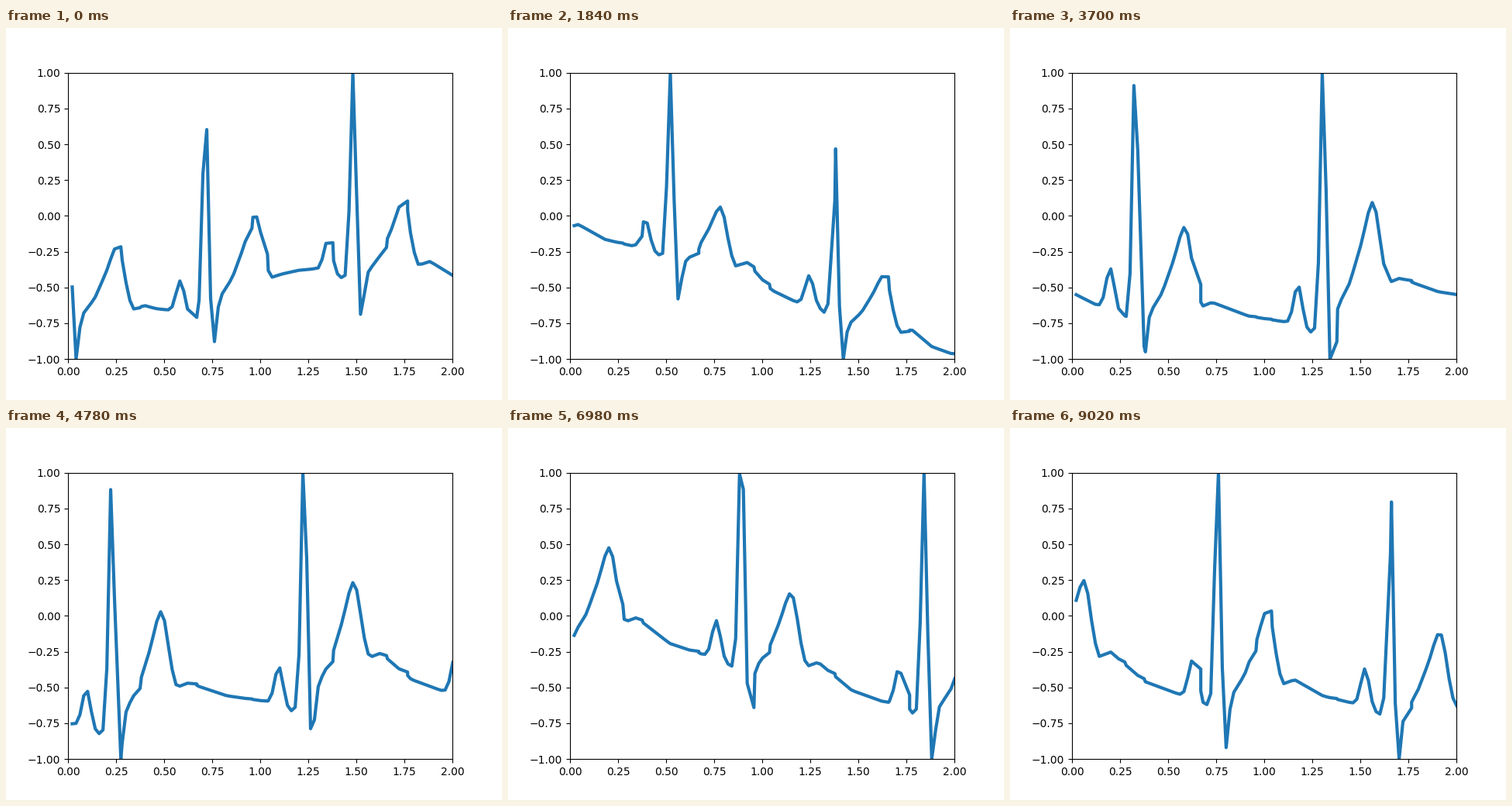
Write a matplotlib script that moves like this. It is 640 by 480 pixels and loops after 9.04 s.

```python
import numpy as np
import matplotlib.pyplot as plt
from matplotlib.animation import FuncAnimation

FRAMES, WINDOW, STEP = 452, 100, .02

# Time of each R peak in samples, resting level before and after the beat
BEATS = [(-.2, -.64, -.635), (35.64, -.64, -.42), (74.08, -.36, -.335),
         (118, -.47, -.62), (160.7, -.89, -1.12), (201.35, -1.28, -1.29),
         (250.2, -1.37, -1.16), (300.27, -1.24, -.99), (346.2, -1.18, -1.11),
         (393.47, -1.3, -1.37), (441, -1.58, -1.57), (488.78, -1.79, -1.73),
         (533.65, -1.84, -1.86)]
P_WAVE, R_WAVE, S_WAVE = (-6.5, 1.1, .23), (0, .72, 1.42), (2, .6, -.27)

# Moments at which late samples arrive together
STALLS = (.275, .375, .67, .957, 1.038, 1.378, 1.657, 1.767)


def mix(a, b, f):
    return a + (b - a) * f


def bell(x, centre, width, height):
    return height * np.exp(-((x - centre) / width) ** 2 / 2)


def slow_wave(r, before, after):
    """Resting level and T wave of one beat as key points."""
    st, top = mix(before, after, .5) - .1, after + .44
    rise = [(3, 0), (4, .13), (7, .32), (10, .65), (12, .93), (13, 1)]
    fall = [(14, .17), (15, .53), (16, .83), (17, 1)]
    return ([(r - 10, before), (r - 3.5, before - .06)]
            + [(r + k, mix(st, top, f)) for k, f in rise]
            + [(r + k, mix(top, after, f)) for k, f in fall]
            + [(r + 20, after + .025)])


def make_signal(s):
    knots = []
    for beat in BEATS:
        points = slow_wave(*beat)
        if knots:
            (x0, y0), (x1, y1) = knots[-1], points[0]
            knots.append((mix(x0, x1, .5), mix(y0, y1, .7)))
        knots += points
    y = np.interp(s, *zip(*knots))
    for r, _, _ in BEATS:
        y += sum(bell(s - r, *wave) for wave in (P_WAVE, R_WAVE, S_WAVE))
    return y


def make_times():
    due = STEP * np.arange(1, WINDOW + 1)
    t = due + .002
    for stall in STALLS:
        t[(due > stall - .031) & (due < stall)] = stall
    return np.maximum.accumulate(t)


signal = make_signal(np.arange(1., FRAMES + WINDOW))
times = make_times()

fig, ax = plt.subplots(figsize=(6.4, 4.8), dpi=100)
ax.set_xlim(0, 2)
ax.set_ylim(-1, 1)
line, = ax.plot([], [], lw=3, color="#1f77b4")


def update(n):
    # Each window is rescaled to fill -1..1
    w = signal[n:n + WINDOW]
    line.set_data(times, 2 * (w - w.min()) / np.ptp(w) - 1)
    return line,


anim = FuncAnimation(fig, update, frames=FRAMES, interval=20, blit=True,
                     repeat=True, repeat_delay=0)
plt.show()
```
